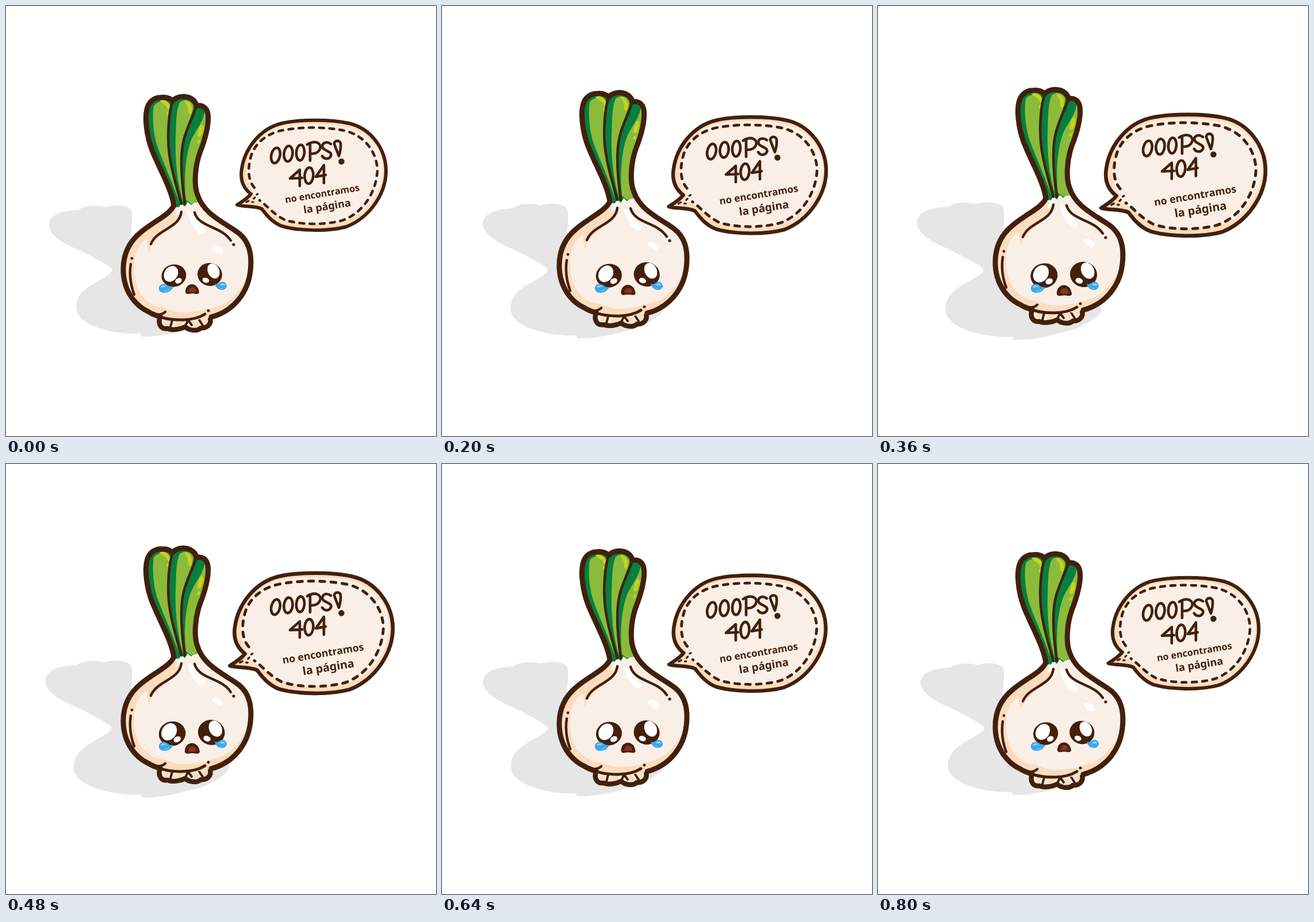
An HTML page for the animation above (0.84 s loop, 748 by 748 pixels).

```html
<!DOCTYPE html>
<html lang="es">
<head>
<meta charset="utf-8">
<title>404</title>
<style>
html, body { margin: 0; width: 100%; height: 100%; overflow: hidden; background: #fff; }
svg { display: block; width: 100vw; height: 100vh; }
.ink { fill: none; stroke: #42200c; stroke-linecap: round; stroke-linejoin: round; }
.dark { fill: #42200c; }
.skin { fill: #f9efe7; }
.peach { fill: #fcdcbf; }
.green { fill: #8bbb3b; }
.deep { fill: #067f3f; }
.lime { fill: #c6d31c; }
.white { fill: #fff; }
text { font-family: "Noto Sans", sans-serif; font-weight: 700; fill: #42200c; text-anchor: middle; }
</style>
</head>
<body>
<svg viewBox="0 0 748 748">
  <defs>
    <path id="leafShape" d="M292 350C288 318 266 282 253 248C245 226 241 196 245 180C248 166 258 159 270 159C279 158 286 161 290 165C297 157 309 156 318 159C326 162 331 168 331 174C340 171 349 176 351 187C354 205 346 233 338 253C328 280 327 312 333 328L334 350Z"/>
    <path id="bulbShape" d="M292 347C284 364 256 375 234 394C212 412 204 434 204 458C204 497 226 522 248 532C256 537 262 539 268 540C292 548 335 548 357 541C378 536 399 522 412 500C422 484 426 465 426 445C426 418 415 401 399 391C374 374 343 360 333 328L310 322Z"/>
    <path id="bubbleShape" d="M426 327C413 317 407 303 410 284C415 248 442 213 480 204C510 197 565 197 596 204C633 212 661 247 661 287C661 326 633 368 592 384C558 393 508 391 480 383C462 376 452 362 445 353C432 347 415 350 402 346C410 341 420 335 426 327Z"/>
    <clipPath id="leafClip"><use href="#leafShape"/></clipPath>
    <clipPath id="bulbClip"><use href="#bulbShape"/></clipPath>
    <clipPath id="bubbleClip"><use href="#bubbleShape"/></clipPath>
  </defs>
  <rect width="748" height="748" fill="#fff"/>

  <path id="shadow" fill="#e6e6e6" d="M75 380C76 361 103 355 126 355C137 346 160 346 172 350C190 345 212 346 218 356C222 372 216 395 216 420L330 420L381 525C377 534 369 540 359 546C348 552 338 558 323 561C303 566 270 576 237 575C234 574 233 573 234 570C192 572 122 558 122 524C122 493 158 482 176 469C183 465 187 460 183 456C173 448 148 435 128 425C104 415 74 400 75 380Z"/>

  <g id="onion">
    <path class="skin" d="M268 541C264 552 269 563 281 561C290 565 304 562 312 558C318 565 334 566 339 560C350 561 358 553 355 543Z"/>
    <path class="peach" d="M276 546L285 546L282 556L275 555ZM297 549L309 549L304 557L292 557ZM322 548L332 547L336 557L326 559ZM341 545L349 544L351 551L346 555Z"/>
    <path class="ink" stroke-width="8.5" d="M268 541C264 552 269 563 281 561C290 565 304 562 312 558C318 565 334 566 339 560C350 561 358 553 355 543"/>
    <path class="ink" stroke-width="4" d="M289 547L286 558M316 548L312 556M318 548L323 555M336 546L342 555"/>

    <use href="#bulbShape" class="skin"/>
    <g clip-path="url(#bulbClip)">
      <path class="peach" d="M300 352C280 366 240 382 200 410L196 540L340 560L410 535L430 440C419 480 403 506 376 519C352 529 320 536 296 532C284 530 280 524 266 524C243 518 226 497 223 466C220 438 228 416 245 405C246 413 247 423 248 430C251 406 298 385 302 362Z"/>
      <path fill="#fbe3cf" d="M206 425C211 440 213 480 222 510L200 500Z"/>
      <path class="white" d="M316 359C322 357 327 361 330 369C334 376 343 383 347 391C348 397 339 398 334 394C326 386 319 373 316 359ZM302 346L309 342L304 360L294 365Z"/>
      <rect class="white" x="358" y="419" width="20" height="10" rx="5" transform="rotate(33 368 424)"/>
    </g>

    <g clip-path="url(#leafClip)">
      <path class="deep" d="M235 150H360V341L328 341L322 346L316 341L311 349L305 343L300 352H235Z"/>
      <path class="green" d="M257 174C264 163 283 164 288 177C282 202 280 238 287 275C291 300 297 322 301 342C292 312 277 281 265 249C256 226 254 193 257 174Z"/>
      <path class="green" d="M302 168C310 160 323 164 326 174C326 185 314 208 309 231C303 258 303 298 309 342C299 316 294 270 295 237C296 210 295 184 302 168Z"/>
      <path class="green" d="M346 181C354 195 353 219 344 247C333 277 330 308 336 341L322 344L313 337C309 300 312 263 321 236C329 216 343 204 346 181Z"/>
      <path class="lime" d="M267 165C276 161 286 168 286 177C285 183 281 180 280 176C277 171 271 170 267 165ZM310 165C318 164 325 173 323 184C321 192 316 189 317 181C317 174 313 170 310 165ZM340 206C346 207 343 218 339 226C335 231 331 225 334 219C336 214 336 208 340 206Z"/>
      <ellipse class="lime" cx="282" cy="187" rx="2" ry="3"/>
      <ellipse class="lime" cx="335" cy="236" rx="2.2" ry="3.6" transform="rotate(20 335 236)"/>
    </g>
    <path class="ink" stroke-width="4.5" d="M290 165C283 186 281 220 283 247C286 282 298 318 305 344M331 174C325 194 314 212 309 234C302 263 306 309 311 344"/>
    <path class="ink" stroke-width="9" d="M292 347C288 318 266 282 253 248C245 226 241 196 245 180C248 166 258 159 270 159C279 158 286 161 290 165C297 157 309 156 318 159C326 162 331 168 331 174C340 171 349 176 351 187C354 205 346 233 338 253C328 280 327 312 333 328C343 360 374 374 399 391C415 401 426 418 426 445C426 465 422 484 412 500C399 522 378 536 357 541M292 347C284 364 256 375 234 394C212 412 204 434 204 458C204 497 226 522 248 532C256 537 262 539 268 540"/>
    <path class="ink" stroke-width="5" d="M268 541C292 548 326 549 346 536"/>
    <path class="ink" stroke-width="4.4" d="M305 358C302 387 262 388 252 414M328 359C336 386 374 382 391 408M217 449C214 468 217 486 223 502M277 532C273 536 268 537 263 537"/>
    <g class="dark"><circle cx="396" cy="415" r="2.6"/><circle cx="219" cy="439" r="2.4"/><circle cx="352" cy="530" r="2.5"/></g>
  </g>

  <g id="face">
    <ellipse class="dark" cx="292" cy="469" rx="21.5" ry="19.5" transform="rotate(-12 292 469)"/>
    <ellipse class="dark" cx="354.5" cy="467" rx="21.5" ry="20" transform="rotate(12 354.5 467)"/>
    <g class="white">
      <ellipse cx="287" cy="466" rx="11.5" ry="14.5" transform="rotate(32 287 466)"/>
      <ellipse cx="300" cy="478" rx="6" ry="4.5" transform="rotate(-25 300 478)"/>
      <ellipse cx="361" cy="461" rx="10" ry="13.5" transform="rotate(-26 361 461)"/>
      <ellipse cx="347.5" cy="477" rx="6" ry="4.3" transform="rotate(20 347.5 477)"/>
    </g>
    <path class="dark" d="M312 498C312 488 318 484 324 484C331 485 335 490 336 498C334 503 329 500 324 500C319 500 314 503 312 498Z"/>
    <path fill="#8a321f" d="M317 497C318 491 321 489 324 489C328 489 331 492 331 497C327 498 321 498 317 497Z"/>
  </g>

  <g id="tears">
    <path fill="#3da7ec" d="M291 489C288 495 283 499 275 499C267 499 264 492 267 487C271 482 278 483 282 487C285 489 288 489 291 489Z"/>
    <path fill="#3da7ec" d="M363 483C365 490 369 494 376 494C384 493 386 487 382 482C378 478 373 480 371 482C368 484 366 484 363 483Z"/>
    <path fill="#8fd3fb" d="M269 489C271 485 277 485 280 489C276 487 273 491 269 489ZM372 485C375 481 380 482 382 486C379 485 376 488 372 485Z"/>
    <path fill="#70c2f5" d="M274 495C279 496 283 494 286 491C284 496 279 498 274 495ZM368 487C371 491 375 492 379 490C376 493 370 492 368 487Z"/>
  </g>

  <g id="bubble">
    <use href="#bubbleShape" class="peach"/>
    <path class="skin" clip-path="url(#bubbleClip)" d="M431 326C418 308 417 286 424 262C433 234 454 216 482 210C515 203 565 204 594 211C632 220 657 251 656 284C654 326 628 361 588 374C550 382 508 380 484 372C464 363 455 346 431 337Z"/>
    <use href="#bubbleShape" class="ink" stroke-width="6"/>
    <path class="ink" stroke-width="4.5" stroke-dasharray="8 9.8" d="M432 316C421 303 420 284 426 262C433 238 455 221 482 216C520 209 562 211 590 217C625 226 645 255 646 285C645 322 622 360 585 373C550 382 510 380 485 372C465 362 455 348 441 338"/>
    <path class="ink" stroke-width="3.2" d="M418 341L422 339M428 341L430 341M431 335L433 333M436 328L438 327"/>
    <text font-size="16.1" transform="translate(551 332) rotate(-9.5)">no encontramos</text>
    <text font-size="18" transform="translate(559.5 354.5) rotate(-9)">la página</text>
  </g>

  <g id="title" class="ink" stroke-width="4.6">
    <ellipse cx="469" cy="260" rx="7.5" ry="13.5" transform="rotate(12 469 260)"/>
    <ellipse cx="491" cy="257" rx="7.5" ry="13.5" transform="rotate(6 491 257)"/>
    <ellipse cx="512" cy="255" rx="7" ry="13.5" transform="rotate(4 512 255)"/>
    <path d="M529 239L529 269M524 241C538 232 550 239 546 249C542 257 535 257 530 257"/>
    <path d="M565 240C556 233 546 241 552 248C558 253 568 254 565 261C561 268 553 266 550 261"/>
    <path d="M579 261L571 240C571 233 581 233 582 239C583 248 581 255 579 261Z"/>
    <circle class="dark" cx="583.5" cy="270.5" r="3"/>
    <path d="M515 299L494 300L511 285L511 313"/>
    <ellipse cx="527" cy="295" rx="7.5" ry="14" transform="rotate(4 527 295)"/>
    <path d="M556 294L539 297L553 277L553 308"/>
  </g>
</svg>
<script>
const LOOP = 840, PEAK = 400, STEP = 40;
const [shadow, onion, face, bubble, title] =
  ["shadow", "onion", "face", "bubble", "title"].map(id => document.getElementById(id));

const move = (el, y) => el.setAttribute("transform", `translate(0 ${y})`);
const grow = (el, s, x, y) =>
  el.setAttribute("transform", `translate(${x} ${y}) scale(${s}) translate(${-x} ${-y})`);

function draw(ms) {
  const t = Math.floor((ms % LOOP) / STEP) * STEP;
  const p = t < PEAK ? t / PEAK : (LOOP - t) / (LOOP - PEAK);
  move(onion, -13.6 * p);
  move(title, -13.6 * p);
  grow(shadow, 1 + 0.055 * p, 219, 459);
  grow(face, 1 + 0.11 * p, 323.5, 468);
  grow(bubble, 1 + 0.115 * p, 535, 294.5);
}

let start;
function tick(now) {
  start ??= now;
  draw(now - start);
  requestAnimationFrame(tick);
}
draw(0);
requestAnimationFrame(tick);
</script>
</body>
</html>
```
